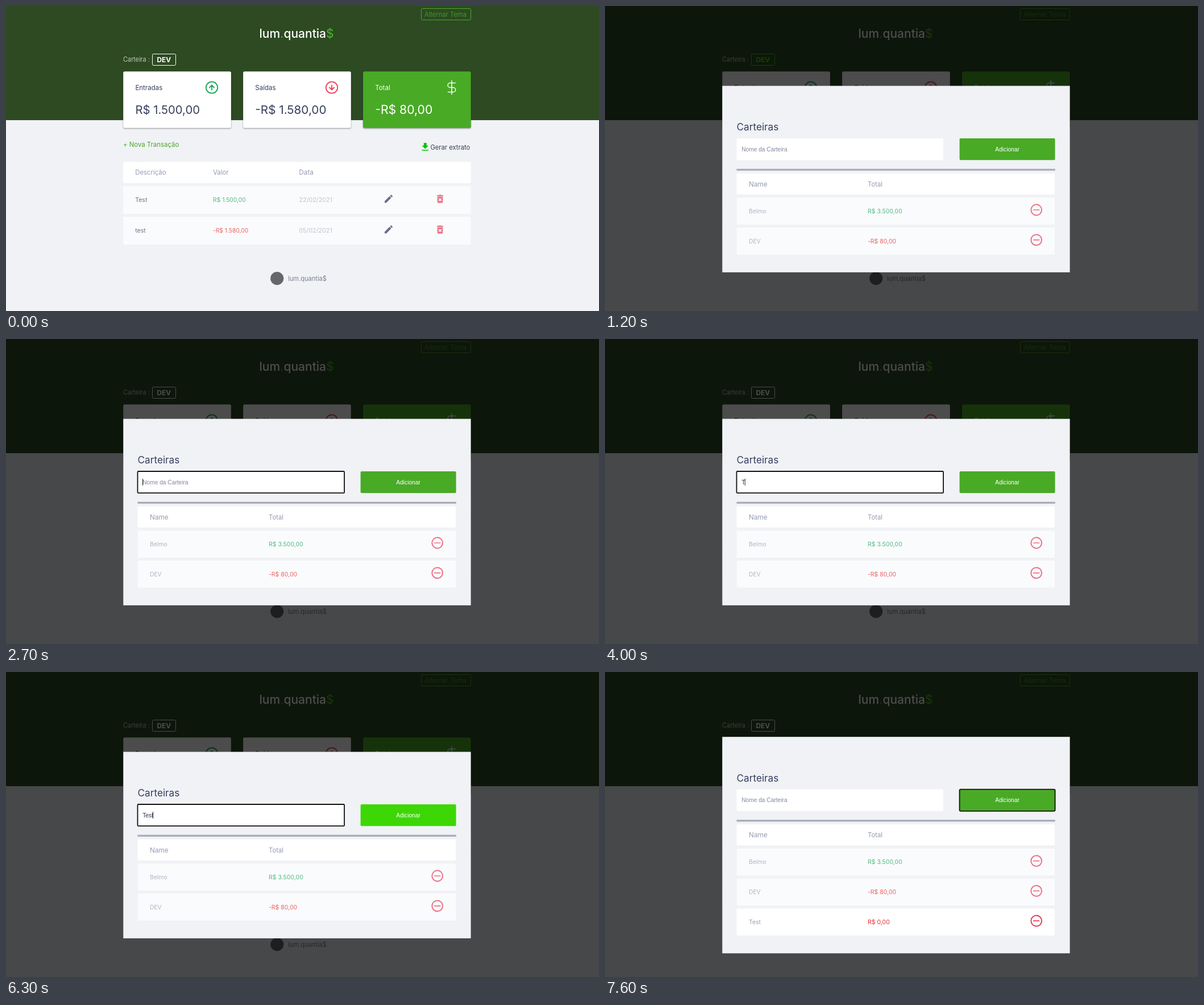
An HTML page for the animation above (8 s loop, 1043x537 px).

```html
<!DOCTYPE html>
<html lang="pt-BR">
<head>
<meta charset="utf-8">
<title>Carteiras</title>
<style>
  html, body { margin: 0; width: 100%; height: 100%; overflow: hidden; background: #f0f2f5; }
  svg { display: block; width: 100vw; height: 100vh; }
  text { font-family: Inter, "Open Sans", sans-serif; white-space: pre; }
  .control { font-family: "Liberation Sans", Arial, sans-serif; }
  .card { filter: drop-shadow(0 1.5px 1.3px rgba(0, 0, 0, .42)); }
  .line { fill: none; stroke-linecap: round; stroke-linejoin: round; }
</style>
</head>
<body>
<svg id="stage" viewBox="0 0 1043 537"></svg>
<script>
const LOOP = 8000;
const GREEN = '#49aa26', NAVY = '#363f5f', MUTED = '#969cb3';
const INCOME = '#12a454', EXPENSE = '#e92929', ROSE = '#e83f5b', PAGE = '#f0f2f5';
const MODAL_GROWTH = 26.4, ROW_PITCH = 52.8;

const text = (x, y, size, fill, content, extra = '') =>
  `<text x="${x}" y="${y}" font-size="${size}" fill="${fill}" ${extra}>${content}</text>`;
const rect = (x, y, w, h, fill, extra = '') =>
  `<rect x="${x}" y="${y}" width="${w}" height="${h}" fill="${fill}" ${extra}/>`;
const icon = (cx, cy, scale, fill, d) =>
  `<path transform="translate(${cx} ${cy}) scale(${scale}) translate(-12 -12)" fill="${fill}" d="${d}"/>`;

const PENCIL = 'M3 17.25V21h3.75L17.81 9.94l-3.75-3.75zM20.71 7.04c.39-.39.39-1.02 0-1.41l-2.34-2.34c-.39-.39-1.02-.39-1.41 0l-1.83 1.83 3.75 3.75z';
const BIN = 'M6 19c0 1.1.9 2 2 2h8c1.1 0 2-.9 2-2V7H6zm2.46-7.12l1.41-1.41L12 12.59l2.12-2.12 1.41 1.41L13.41 14l2.12 2.12-1.41 1.41L12 15.41l-2.12 2.12-1.41-1.41L10.59 14zM15.5 4l-1-1h-5l-1 1H5v2h14V4z';
const DOWNLOAD = 'M19 9h-4V3H9v6H5l7 7zM5 18v2h14v-2z';

const arrow = (cx, color, dir) => `
  <g class="line" stroke="${color}" stroke-width="1.8" transform="translate(${cx} 143.5) scale(1 ${dir})">
    <circle r="10.2"/><path d="M0 4.2V-4M-4 0L0-4.1 4 0"/>
  </g>`;

const card = (x, fill, ink, label, size, amount, mark) => `
  ${rect(x, 115.2, 189.7, 99.5, fill, 'rx="2.5" class="card"')}
  ${text(x + 21.2, 148, 11.5, ink, label)}
  ${text(x + 21.2, 189.5, size, ink, amount)}
  ${mark}`;

const transaction = (y, name, amount, color, date) => `
  <g opacity=".7" transform="translate(0 ${y})">
    ${rect(206.2, 0, 611.5, 48.8, '#fff', 'rx="2"')}
    ${text(227.2, 28, 10.6, NAVY, name)}
    ${text(364, 28, 10.3, color, amount)}
    ${text(515.3, 28, 10.9, MUTED, date, 'font-weight="300"')}
    ${icon(673, 22.2, .78, '#363660', PENCIL)}
    ${icon(763.5, 22.3, .8, ROSE, BIN)}
  </g>`;

const wallet = (id, index, name, size, amount, color) => `
  <g id="${id}" opacity=".7" transform="translate(0 ${337.3 + index * ROW_PITCH})">
    ${rect(231.5, 0, 559.5, 47.6, '#fff', 'rx="1.5"')}
    ${text(253, 27.6, size, MUTED, name)}
    ${text(462, 27.6, 10.5, color, amount)}
    <g class="line" stroke="${ROSE}" stroke-width="2"><circle cx="758.7" cy="21.7" r="9.4"/><path d="M753.8 21.7h9.8" stroke-width="1.7"/></g>
  </g>`;

const dashboard = `
  ${rect(0, 0, 1043, 537, PAGE)}
  ${rect(0, 0, 1043, 201, '#2d4a22')}
  ${rect(730.5, 4.5, 87, 20, 'none', `rx="2" stroke="${GREEN}"`)}
  ${text(736, 18.6, 11.4, GREEN, 'Alternar Tema', 'font-weight="300"')}
  ${text(445.5, 56, 21, '#fff', `lum<tspan fill="${GREEN}">.</tspan>quantia<tspan fill="${GREEN}">$</tspan>`, 'font-weight="500"')}
  ${text(206, 98, 11.1, '#fff', 'Carteira :', 'font-weight="300" fill-opacity=".9"')}
  ${rect(257.5, 84.5, 41, 20, 'none', 'id="tagBox" rx="2" stroke="#fff"')}
  ${text(277.8, 98.6, 11.9, '#fff', 'DEV', 'id="tagText" font-weight="700" text-anchor="middle"')}
  ${card(206.2, '#fff', NAVY, 'Entradas', 20.3, 'R$ 1.500,00', arrow(362, INCOME, 1))}
  ${card(417.1, '#fff', NAVY, 'Saídas', 20.7, '-R$ 1.580,00', arrow(573, ROSE, -1))}
  ${card(628, GREEN, '#fff', 'Total', 21.2, '-R$ 80,00',
    '<path class="line" stroke="#fff" stroke-width="1.5" d="M784 131.5v24M790.3 135.5h-9.2a4 4 0 0 0 0 8h5.6a4 4 0 0 1 0 8H777.5"/>')}
  ${text(206, 248, 11.4, GREEN, '+ Nova Transação')}
  ${icon(737.3, 248.3, .82, '#0bc30b', DOWNLOAD)}
  ${text(746.5, 252.5, 11.2, NAVY, 'Gerar extrato')}
  ${rect(206.2, 274.4, 611.5, 37.4, '#fff', 'rx="2"')}
  ${text(227.2, 297, 11.4, MUTED, 'Descrição')}
  ${text(364, 297, 11.4, MUTED, 'Valor')}
  ${text(515.3, 297, 11.8, MUTED, 'Data')}
  ${transaction(317.2, 'Test', 'R$ 1.500,00', INCOME, '22/02/2021')}
  ${transaction(371.2, 'test', '-R$ 1.580,00', EXPENSE, '05/02/2021')}
  <circle cx="476.7" cy="479.6" r="11.6" fill="#66666b"/>
  ${text(496, 484, 11.1, '#7d8296', 'lum.quantia$')}`;

const modal = `
  <g id="modal">
    ${rect(0, 0, 1043, 537, '#000', 'opacity=".7"')}
    ${rect(206.3, 140.6, 611.3, 328.3, PAGE, 'id="panel"')}
    <g id="content">
      ${text(231.5, 219, 17.2, NAVY, 'Carteiras')}
      ${rect(231.5, 233, 363.6, 38.2, '#fff', 'id="field" rx="1.5" stroke="#101010"')}
      ${text(240.2, 255.6, 10.2, '#8388a0', '', 'id="entry" class="control"')}
      ${rect(240, 246, 1, 12, '#222', 'id="caret"')}
      ${rect(623.6, 233, 168, 38.2, GREEN, 'id="add" rx="2" stroke="#101010"')}
      ${text(707.6, 255.6, 10.2, '#fff', 'Adicionar', 'class="control" text-anchor="middle"')}
      ${rect(231.5, 286.7, 560.3, 3.1, '#a5a9b8')}
      ${rect(231.5, 294.6, 559.5, 37.4, '#fff', 'rx="1.5"')}
      ${text(253, 317.6, 11.8, MUTED, 'Name')}
      ${text(462, 317.6, 11.3, MUTED, 'Total')}
      ${wallet('first', 0, 'Belmo', 10.4, 'R$ 3.500,00', INCOME)}
      ${wallet('second', 1, 'DEV', 10.3, '-R$ 80,00', EXPENSE)}
      ${wallet('third', 2, 'Test', 10.5, 'R$ 0,00', EXPENSE)}
    </g>
  </g>`;

document.getElementById('stage').innerHTML = dashboard + modal;

const parts = Object.fromEntries(
  [...document.querySelectorAll('[id]')].map(node => [node.id, node]));

// Each step overrides part of the state from its time on.
const steps = [
  [0, { tag: 0, open: false, focus: '', typed: 0, caret: false, hover: 0, added: false, row: '' }],
  [300, { tag: .6 }],
  [500, { tag: 1 }],
  [1200, { open: true }],
  [1800, { tag: .7 }],
  [1900, { tag: .3 }],
  [2000, { tag: 0 }],
  [2700, { focus: 'field', caret: true }],
  [3200, { caret: false }],
  [3700, { caret: true }],
  [4000, { typed: 1 }],
  [4400, { typed: 2 }],
  [4800, { typed: 3 }],
  [5000, { typed: 4 }],
  [5600, { caret: false }],
  [6200, { caret: true, hover: .5 }],
  [6300, { hover: 1 }],
  [6600, { added: true, focus: 'add', typed: 0, caret: false, hover: 0 }],
  [7500, { row: 'second' }],
  [7600, { row: 'third' }],
];
const caretX = [240, 245.7, 251, 256, 258];

const mix = (from, to, p) =>
  `rgb(${from.map((v, i) => Math.round(v + (to[i] - v) * p)).join()})`;
const set = (id, attrs) => {
  for (const name in attrs) parts[id].setAttribute(name, attrs[name]);
};
const show = (id, on) => set(id, { visibility: on ? 'inherit' : 'hidden' });

function render(time) {
  const s = Object.assign({}, ...steps.filter(([at]) => at <= time).map(([, change]) => change));
  const bright = [61, 215, 5];
  const tag = mix([255, 255, 255], bright, s.tag);
  const growth = s.added ? MODAL_GROWTH : 0;

  set('tagBox', { stroke: tag });
  set('tagText', { fill: tag });
  show('modal', s.open);
  set('panel', { y: 140.6 - growth, height: 328.3 + 2 * growth });
  set('content', { transform: `translate(0 ${-growth})` });
  for (const id of ['field', 'add']) set(id, { 'stroke-width': s.focus === id ? 1.8 : 0 });
  parts.entry.textContent = s.typed ? 'Test'.slice(0, s.typed) : 'Nome da Carteira';
  set('entry', { fill: s.typed ? '#2f3242' : '#8388a0' });
  set('caret', { x: caretX[s.typed] });
  show('caret', s.caret);
  set('add', { fill: mix([73, 170, 38], bright, s.hover) });
  show('third', s.added);
  for (const id of ['second', 'third']) set(id, { opacity: s.row === id ? 1 : .7 });
}

const start = performance.now();
function tick() {
  render((performance.now() - start) % LOOP);
  requestAnimationFrame(tick);
}
tick();
</script>
</body>
</html>
```
